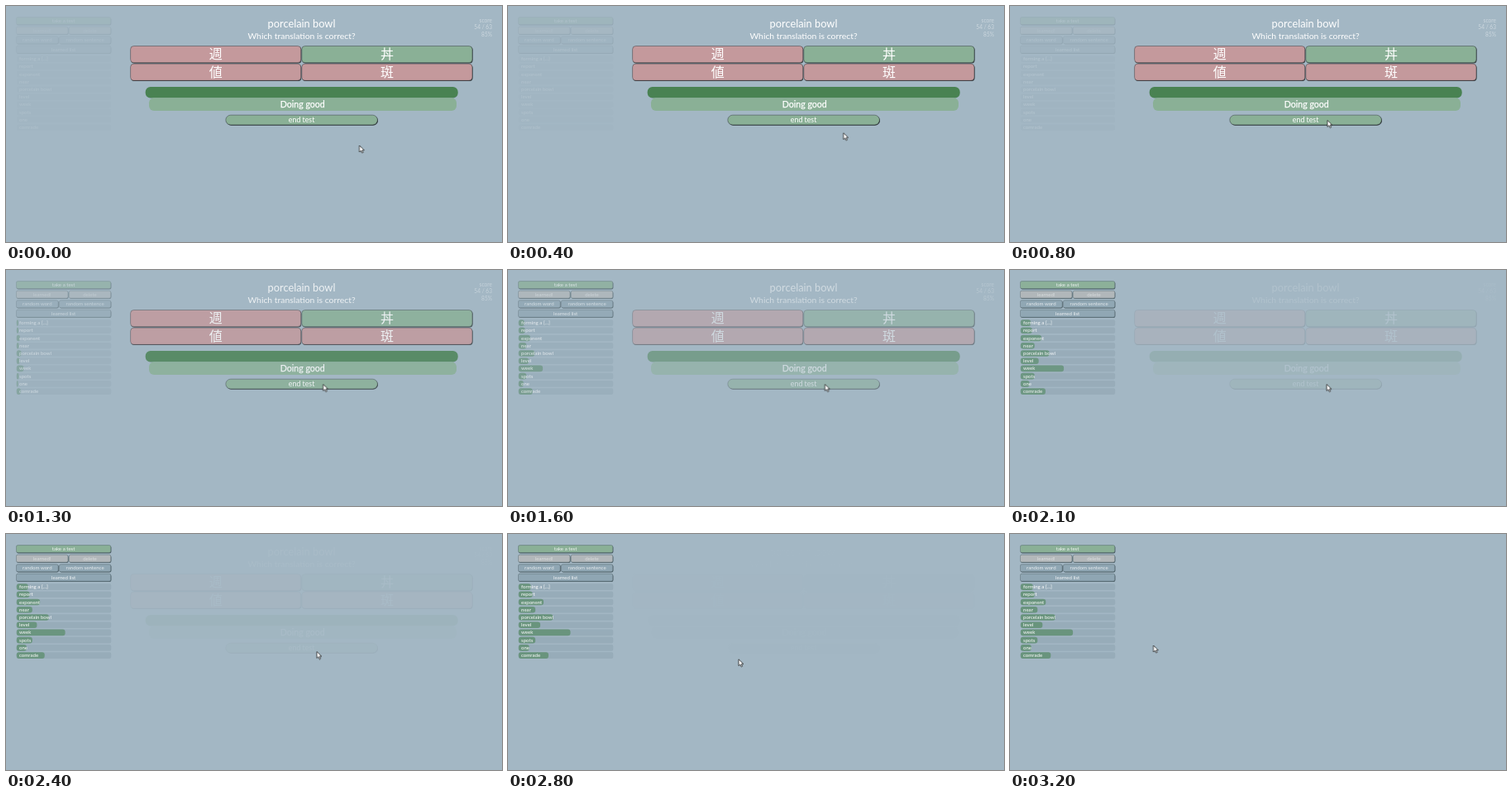
Animation of 600x286 px, one loop 3.3 s. Source, as an HTML page:

```html
<!DOCTYPE html>
<html lang="en">
<head>
<meta charset="utf-8">
<title>Vocabulary test</title>
<style>
  html, body { margin: 0; width: 100%; height: 100%; overflow: hidden; background: #a3b7c4; }
  svg { display: block; width: 100%; height: 100%; }
  text { font-family: Lato, "Noto Sans", sans-serif; fill: #fff; text-anchor: middle; }
  .kanji { font-family: "Noto Sans CJK JP", "Noto Sans CJK", sans-serif; font-weight: 300; }
</style>
</head>
<body>
<svg viewBox="0 0 600 286">
  <g id="test"></g>
  <g id="menu"></g>
  <path id="cursor" d="M0 0V8L1.9 6.3L3.2 9.1L4.6 8.5L3.3 5.8H5.9Z"
        fill="#fff" stroke="#222" stroke-width=".8" stroke-linejoin="round"/>
</svg>
<script>
const LOOP = 3300, STEP = 100;
const GREEN = '#8ab096', RED = '#c4999c', GREY = '#b3b8ba', SLATE = '#8fa6b3';
const test = document.getElementById('test');
const menu = document.getElementById('menu');
const cursor = document.getElementById('cursor');

function add(parent, tag, attrs, content = '') {
  const node = document.createElementNS('http://www.w3.org/2000/svg', tag);
  for (const [key, value] of Object.entries(attrs)) node.setAttribute(key, value);
  node.textContent = content;
  return parent.appendChild(node);
}

function box(parent, x, y, width, height, rx, fill, more = {}) {
  return add(parent, 'rect', { x, y, width, height, rx, fill, ...more });
}

// y is the vertical middle of the line
function label(parent, content, x, y, size, more = {}) {
  return add(parent, 'text', { x, y: y + size * 0.34, 'font-size': size, ...more }, content);
}

// Filled button with a thin border and a darker right and bottom edge
function button(parent, content, x, y, w, h, r, fill, size, more = {}, edge = '#2b3336') {
  box(parent, x + 0.6, y + 0.8, w, h, r, edge);
  box(parent, x, y, w, h, r, fill, { stroke: edge, 'stroke-width': 0.6, 'stroke-opacity': 0.75 });
  label(parent, content, x + w / 2, y + h / 2, size, more);
}

// Test panel
label(test, 'porcelain bowl', 357.5, 21.5, 12.8);
label(test, 'Which translation is correct?', 357.5, 36, 10.4);
[['週', 0, 0, RED], ['丼', 1, 0, GREEN], ['値', 0, 1, RED], ['斑', 1, 1, RED]]
  .forEach(([sign, col, row, fill]) =>
    button(test, sign, 150.6 + col * 207.2, 48.5 + row * 21.6, 206.2, 20.2, 4, fill, 16, { class: 'kanji' }));
box(test, 168.7, 98, 378, 13.6, 6, '#498252');
box(test, 173, 111.3, 372, 15.8, 6, GREEN);
label(test, 'Doing good', 358.8, 119.5, 10.6, { stroke: '#fff', 'stroke-width': 0.25 });
button(test, 'end test', 265.8, 132.2, 183.6, 11.8, 6, GREEN, 8.8);
['score', '54 / 63', '85%'].forEach((line, i) =>
  label(test, line, 588, 17.3 + i * 8.5, 6.6, { style: 'text-anchor:end', opacity: 0.45 }));

// Menu
const MENU_EDGE = '#4c5f66';
[
  ['take a test', 12.4, 13.6, 114.4, GREEN, 0.9],
  ['learned!', 12.4, 25.2, 62.6, GREY, 0.55],
  ['delete', 76.2, 25.2, 50.6, GREY, 0.55],
  ['random word', 12.4, 36.8, 50.8, SLATE, 0.8],
  ['random sentence', 64.4, 36.8, 62.4, SLATE, 0.8],
  ['learned list', 12.4, 48.2, 114.4, SLATE, 0.9],
].forEach(([name, x, y, w, fill, opacity]) =>
  button(menu, name, x, y, w, 9, 2, fill, 6.1, { opacity }, MENU_EDGE));

const words = [
  ['forming a [...]', 15], ['report', 17], ['exponent', 30.5], ['near', 20.5],
  ['porcelain bowl', 42], ['level', 26.5], ['week', 63.3], ['spots', 20.5],
  ['one', 13], ['comrade', 36.5],
];
const bars = words.map(([word, width], i) => {
  const y = 60.3 + i * 9.22;
  box(menu, 12.8, y, 114.4, 7.6, 2, '#97acb9');
  const bar = box(menu, 12.8, y, 0, 7.6, 3, '#69947d');
  label(menu, word, 16, y + 3.7, 6.1, { style: 'text-anchor:start' });
  return [bar, width];
});

// Motion
const animations = [];
function animate(node, frames, options) {
  const animation = node.animate(frames, { fill: 'both', ...options });
  animation.pause();
  animations.push(animation);
}

animate(test, { opacity: [1, 0] }, { delay: 1000, duration: 2000, easing: 'ease' });
animate(menu, [
  { opacity: 0.13, offset: 0 },
  { opacity: 0.19, offset: 0.28, easing: 'ease' },
  { opacity: 1, offset: 1 },
], { duration: 2900 });
for (const [bar, width] of bars)
  animate(bar, { width: ['0px', width + 'px'] }, { delay: 1050, duration: 2000, easing: 'ease' });

const path = [
  [0, 427.5, 169], [100, 427.5, 169, 'ease-in-out'], [700, 384, 138.5],
  [1500, 383.5, 138.5], [2200, 383, 138.5], [2400, 376, 142.5], [2500, 340, 149.5],
  [2700, 300, 153.5], [2900, 258, 150], [3100, 214.5, 139.5], [3200, 173.5, 135], [LOOP, 173.5, 135],
];
animate(cursor, path.map(([time, x, y, easing = 'linear']) => ({
  offset: time / LOOP, transform: `translate(${x}px, ${y}px)`, easing,
})), { duration: LOOP });

const start = performance.now();
function draw() {
  const time = (performance.now() - start) % LOOP;
  const stepped = Math.floor(time / STEP) * STEP;
  for (const animation of animations) animation.currentTime = stepped;
  requestAnimationFrame(draw);
}
draw();
</script>
</body>
</html>
```
